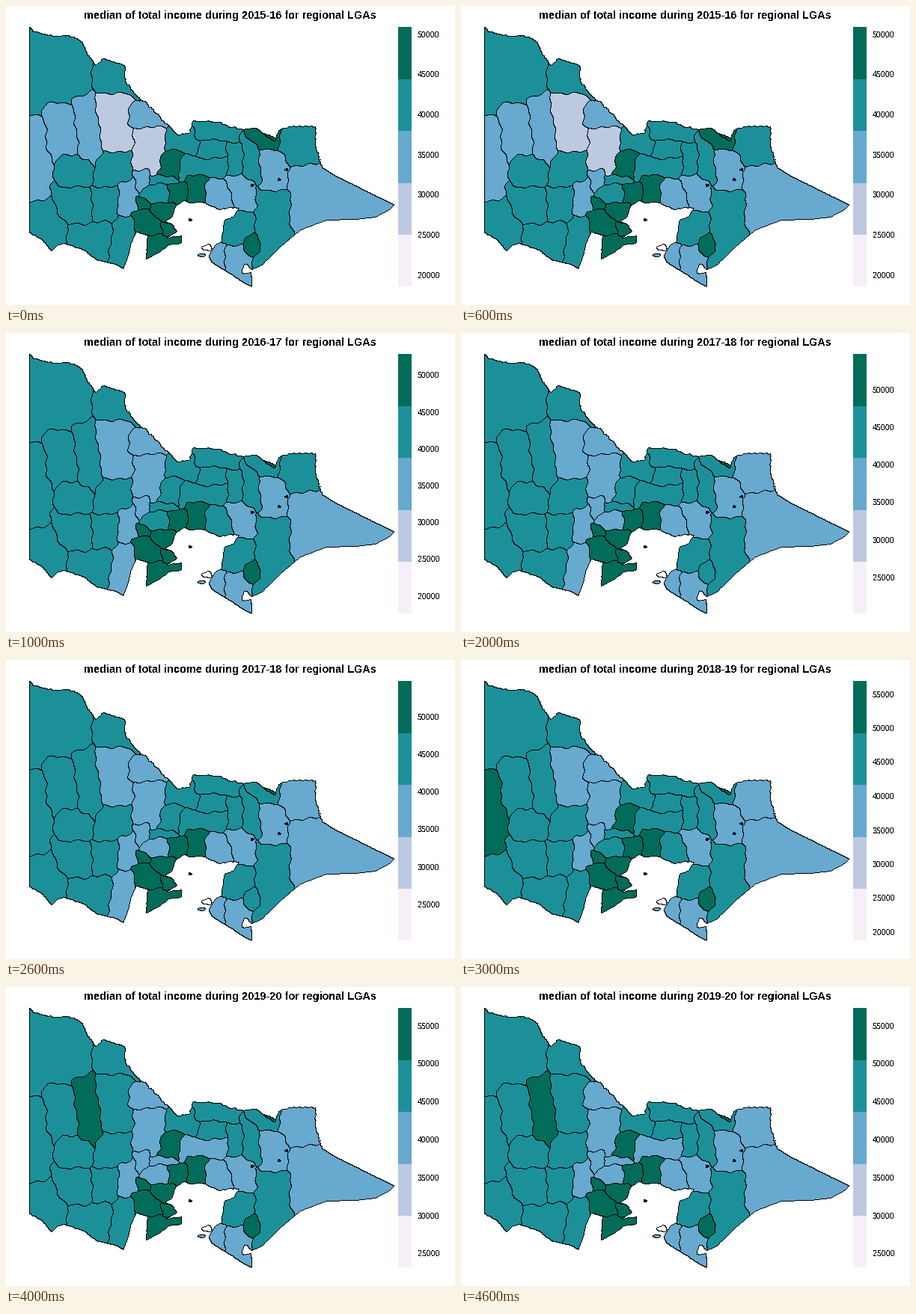
Write a matplotlib script that moves like this. It is 600 px wide and 400 px high and loops after 5000 ms.

```python
import numpy as np
import matplotlib.pyplot as plt
from matplotlib.animation import FuncAnimation
from matplotlib.path import Path

W, H, DPI = 600, 400, 100
PX = 72 / DPI
PALETTE = ["#F6EFF7", "#BDC9E1", "#67A9CF", "#1C9099", "#016C59"]
RGB = np.array([[int(c[i:i + 2], 16) for i in (1, 3, 5)] for c in PALETTE])
FIRST_YEAR, YEARS = 2015, 5
# top label value, its y, and the gap between labels, per year
SCALES = [(50000, 37.5, 53.7), (50000, 56.5, 49.2), (50000, 75.5, 50.3),
          (55000, 45.5, 45.5), (55000, 51.5, 50.8)]

rng = np.random.default_rng(4)
ys, xs = np.mgrid[:H, :W] + 0.5


def coast(amp, *xy):
    """Polyline through key points, shaken every two pixels."""
    pts = np.reshape(xy, (-1, 2)).astype(float)
    out = [pts[:1]]
    for a, b in zip(pts[:-1], pts[1:]):
        t = np.linspace(0, 1, max(2, int(np.hypot(*(b - a)) / 2)))[1:, None]
        shake = rng.uniform(-amp, amp, (len(t), 2))
        shake[-1] = 0
        out.append(a + (b - a) * t + shake)
    return np.vstack(out)


def inside(pts):
    grid = np.column_stack([xs.ravel(), ys.ravel()])
    return Path(pts).contains_points(grid).reshape(H, W)


# State outline, clockwise from the north-west corner
outline = np.vstack([
    # river border
    coast(1.1, 31, 28, 36, 34, 65, 40, 84, 39, 102, 48, 107, 61, 120, 79,
          130, 70, 158, 79, 159, 100, 172, 118, 190, 133, 217, 160, 229, 172,
          245, 170, 250, 153, 285, 155, 297, 161, 318, 165, 334, 163,
          344, 170, 361, 176, 364, 166, 384, 160, 413, 161, 413, 187, 422, 216),
    # ocean side
    coast(0.3, 422, 216, 440, 227, 519, 266, 512, 272, 494, 282, 470, 285,
          428, 286, 394, 299, 372, 317, 342, 346, 327, 353, 328, 375,
          318, 370, 300, 358, 274, 342, 271, 334, 279, 320, 288, 315),
    # capital area and bays, left blank
    coast(0.5, 288, 315, 290, 296, 292, 286, 304, 282, 311, 270, 298, 269,
          285, 272, 262, 262, 246, 263, 238, 260, 226, 268, 221, 283, 212, 288,
          221, 291, 228, 302, 214, 310, 234, 307, 234, 317, 218, 319,
          205, 329, 187, 338, 189, 306, 174, 302, 166, 319, 163, 334, 157, 351),
    # south-west shore
    coast(0.5, 157, 351, 146, 345, 120, 339, 104, 326, 78, 317, 69, 319,
          61, 328, 48, 312, 31, 303),
])
state = inside(outline)

# Each district: a box and its colour level in every year
districts = []


def district(levels, left, top, right, bottom, lean=0):
    districts.append(([int(c) for c in levels],
                      (left + right) / 2, (top + bottom) / 2,
                      (right - left) / 2, (bottom - top) / 2, lean))


# north-west
district("33333", 20, 20, 115, 131)
district("33333", 115, 70, 195, 118)
district("23343", 20, 158, 56, 260)
district("23333", 52, 129, 97, 198)
district("23334", 90, 111, 126, 216, 0.16)
district("12223", 121, 112, 168, 194, 0.12)
district("22222", 158, 132, 222, 162)
district("12222", 168, 162, 213, 226)
# south-west
district("33333", 73, 198, 116, 242)
district("33333", 116, 194, 169, 241)
district("33333", 62, 242, 114, 292)
district("33333", 114, 241, 150, 287)
district("33333", 15, 260, 81, 340)
district("33333", 82, 290, 138, 345)
district("22222", 149, 228, 176, 279)
district("32233", 140, 281, 172, 355, -0.15)
# centre
district("22222", 169, 216, 192, 247)
district("43344", 200, 193, 232, 227)
district("33332", 188, 227, 225, 238)
district("33232", 180, 239, 217, 262)
district("44444", 174, 254, 191, 272)
district("44444", 166, 273, 208, 305)
district("44444", 191, 262, 226, 288)
district("44444", 208, 288, 230, 308)
district("44444", 187, 307, 236, 338)
district("44444", 216, 238, 243, 266)
district("44444", 241, 223, 271, 263)
# north-east
district("33333", 213, 158, 256, 193)
district("33333", 246, 150, 314, 180)
district("33333", 258, 179, 294, 203)
district("33332", 233, 203, 296, 229)
district("33333", 295, 183, 317, 227)
district("33333", 315, 172, 339, 238, 0.1)
district("43333", 320, 164, 366, 192)
district("44444", 339, 163, 363, 182)
district("33222", 365, 158, 423, 212)
district("22222", 338, 192, 377, 246)
district("23232", 262, 230, 304, 274, 0.25)
district("22222", 295, 227, 334, 274, 0.25)
# south-east
district("22222", 378, 212, 525, 300)
district("33333", 332, 245, 380, 350)
district("33333", 287, 272, 331, 318)
district("44344", 317, 304, 342, 334)
district("22222", 294, 320, 325, 375)
district("22222", 268, 316, 292, 350)

# Every pixel joins the district whose box it lies deepest in
wx = xs + 1.0 * np.sin(ys / 2.7) + 1.2 * np.sin(ys / 8 + xs / 13)
wy = ys + 1.0 * np.sin(xs / 2.9) + 1.2 * np.sin(xs / 9 - ys / 11)
depth = [np.hypot(((wx - cx - lean * (wy - cy)) / rx) ** 4,
                  ((wy - cy) / ry) ** 4)
         for _, cx, cy, rx, ry, lean in districts]
SEA, BASS = len(districts), len(districts) - 1
owner = np.where(state, np.argmin(depth, axis=0), SEA)


def blob(cx, cy, rx, ry):
    wave = 1 + 0.2 * np.sin(3 * np.arctan2(ys - cy, xs - cx) + cx)
    return np.hypot((xs - cx) / rx, (ys - cy) / ry) < wave


owner[blob(262, 333, 5, 2)] = BASS
owner[blob(269, 323, 6.5, 4)] = SEA + 1
owner[blob(321, 352, 6, 6)] = SEA

border = np.zeros((H, W), bool)
border[:, 1:] |= owner[:, 1:] != owner[:, :-1]
border[1:] |= owner[1:] != owner[:-1]
for cx, cy in [(365, 232), (375, 219), (329, 240), (246, 286)]:
    border |= blob(cx, cy, 2.5, 2)

bar = np.arange(28, 375)
bar_rgb = RGB[4 - (bar - 28) * 5 // len(bar)][:, None]


def picture(i):
    white = [255, 255, 255]
    lut = np.array([RGB[d[0][i]] for d in districts] + [white, white], np.uint8)
    img = lut[owner]
    img[border] = 0
    img[bar, 524:542] = bar_rgb
    return img


plt.rcParams["text.antialiased"] = False
fig = plt.figure(figsize=(W / DPI, H / DPI), dpi=DPI, facecolor="white")
ax = fig.add_axes([0, 0, 1, 1])
ax.axis("off")
view = ax.imshow(picture(0), extent=(0, W, H, 0), aspect="auto",
                 interpolation="nearest")


def label(x, y, size, **kw):
    return ax.text(x, y, "", fontsize=size * PX, family="Liberation Sans",
                   color="black", va="baseline", **kw)


title = label(299.5, 17, 14.55, ha="center", weight="bold")
ticks = [label(550, 0, 10.7) for _ in range(8)]


def draw(i):
    year = FIRST_YEAR + i
    title.set_text(f"median of total income during {year}-{(year + 1) % 100}"
                   " for regional LGAs")
    view.set_data(picture(i))
    top, y0, gap = SCALES[i]
    for k, tick in enumerate(ticks):
        y = y0 + k * gap
        tick.set_text(str(top - 5000 * k) if y < 372 else "")
        tick.set_y(y + 4)
    return [view, title, *ticks]


anim = FuncAnimation(fig, draw, frames=YEARS, interval=1000, repeat=True)
plt.show()
```
